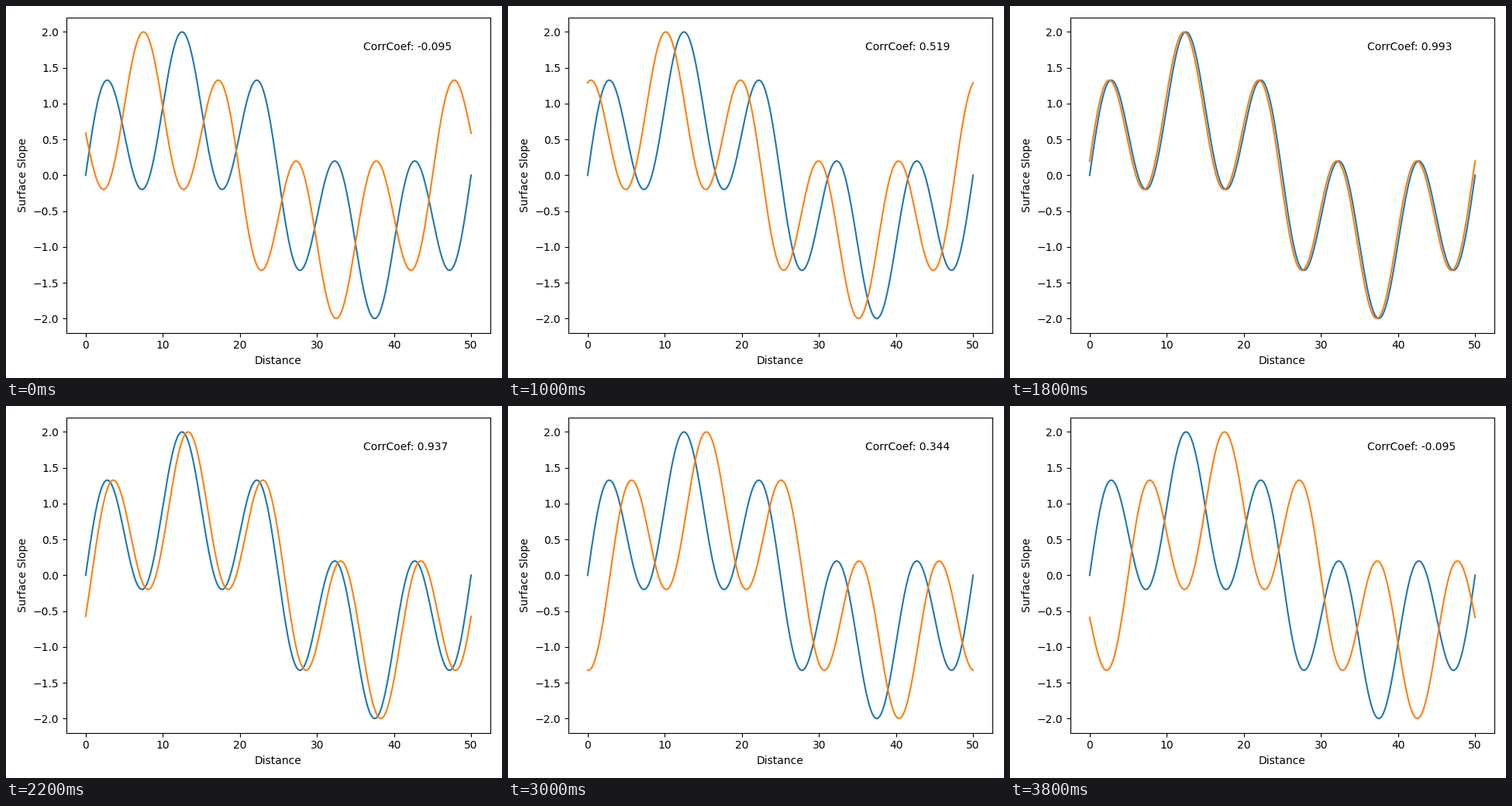
Recreate the animation shown at these times as a matplotlib script. Size 640x480 px, loop 4 s.

```python
import numpy as np
import matplotlib.pyplot as plt
from matplotlib.animation import FuncAnimation

FRAMES = 20
INTERVAL = 200

x = np.linspace(0, 50, 1000)
shifts = np.linspace(-5, 5, FRAMES)


def slope(pos):
    """Sum of a long and a short sine wave."""
    return np.sin(2 * np.pi * pos / 50) + np.sin(2 * np.pi * pos / 10)


fixed = slope(x)

fig, ax = plt.subplots(figsize=(6.4, 4.8), dpi=100)
ax.plot(x, fixed, color="tab:blue")
moving, = ax.plot(x, slope(x - shifts[0]), color="tab:orange")
label = ax.text(36, 1.75, "")
ax.set_xlabel("Distance")
ax.set_ylabel("Surface Slope")
fig.tight_layout()


def update(i):
    y = slope(x - shifts[i])
    moving.set_ydata(y)
    label.set_text(f"CorrCoef: {np.corrcoef(fixed, y)[0, 1]:.3f}")
    return moving, label


anim = FuncAnimation(fig, update, frames=FRAMES, interval=INTERVAL,
                     repeat=True, repeat_delay=0)
plt.show()
```
